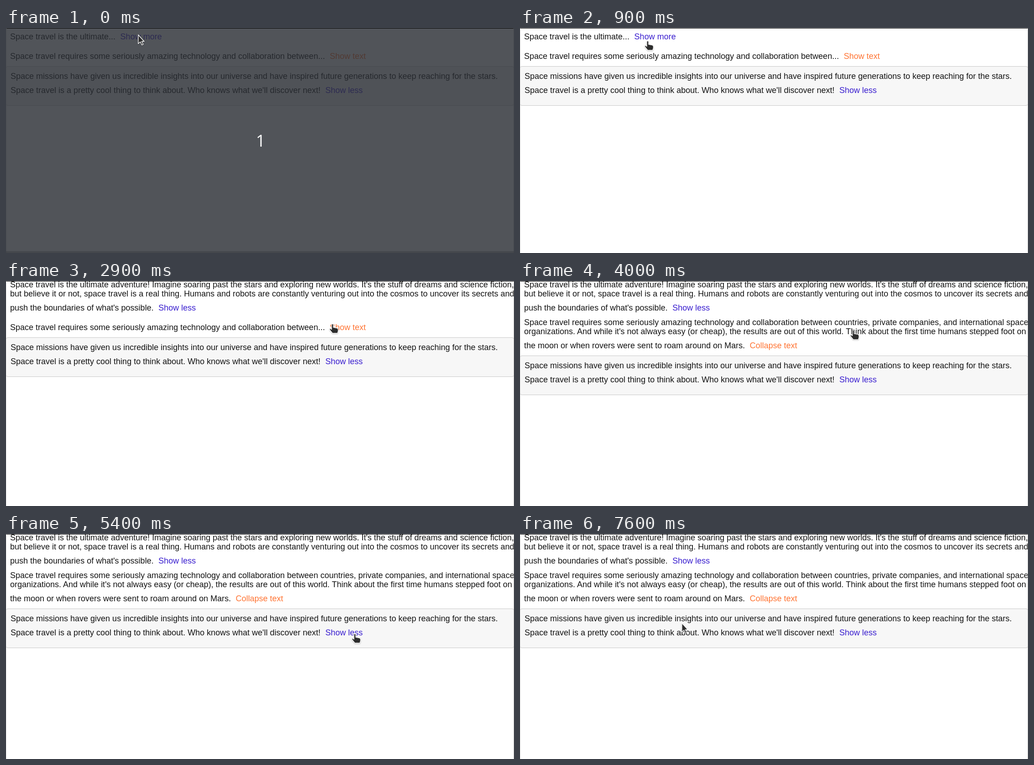
Recreate the animation shown at these times as an HTML page. Size 1114x495 px, loop 8 s.

```html
<!DOCTYPE html>
<html lang="en">
<head>
<meta charset="utf-8">
<title>Show more, show less</title>
<style>
html, body { margin: 0; width: 100%; height: 100%; overflow: hidden; background: #fff; }
#stage {
  position: relative; width: 1114px; height: 495px; overflow: hidden;
  font: 18px/20px "Liberation Sans", Arial, sans-serif; color: #141414; white-space: nowrap;
}
#frame {
  position: absolute; inset: 0; box-sizing: border-box;
  border: solid; border-width: 1px 1px 0; border-color: #000 #c4c4c4 #000 #dedede;
}
#page { position: absolute; left: 0; top: -2px; width: 1114px; }
section { padding-left: 9px; }
.last { padding: 11px 0 12px; }
.box {
  padding: 11px 0 11px 9px;
  background: #f7f7f7; border: 1px solid #c8c8c8; border-radius: 4px;
}
a { margin-left: 10.5px; color: #3a1fcf; }
.orange { color: #ff7433; }
#shade {
  position: absolute; inset: 1px 0 0; box-sizing: border-box;
  background: rgba(41, 45, 51, .81); border-bottom: 4px solid rgba(41, 45, 51, .3);
}
#count {
  position: absolute; left: 548px; top: 222px;
  font: 36px/50px "Open Sans", "Noto Sans", sans-serif; color: #fff;
}
svg { position: absolute; left: 0; top: 0; overflow: visible; filter: drop-shadow(0 1px 1px #0004); }
path { fill: #2d2d2d; stroke: #fff; stroke-width: 1.3; stroke-linejoin: round; }
#beam path { fill: none; stroke-width: 3; }
#beam path + path { stroke: #333; stroke-width: 1.2; }
</style>
</head>
<body>
<div id="stage">
  <div id="page"></div>
  <div id="frame"></div>
  <div id="shade"><div id="count">1</div></div>
  <svg width="1" height="1">
    <g id="arrow"><path d="M0 0V19.500L4.500 15.500L8 22.500L11 21L7.500 14.500H13Z"/></g>
    <g id="hand"><path d="M-2 1.5Q0-1 2 1.5V8L10 9.5Q12.5 10 12.5 13V16L11 21H0L-6 13.5Q-7 10 -4.5 10.5L-2 12.5Z"/></g>
    <g id="beam"></g>
  </svg>
</div>
<script>
const $ = id => document.getElementById(id);
const LOOP = 8000;

const bar = '<path d="M-4-9.5Q-1-9.5 0-8.5Q1-9.5 4-9.5M0-8.5V8.500M-4 9.5Q-1 9.5 0 8.5Q1 9.5 4 9.5"/>';
$('beam').innerHTML = bar + bar;

const sections = [
  {
    short: ['Space travel is the ultimate...'],
    full: [
      "Space travel is the ultimate adventure! Imagine soaring past the stars and exploring new worlds. It's the stuff of dreams and science fiction,",
      'but believe it or not, space travel is a real thing. Humans and robots are constantly venturing out into the cosmos to uncover its secrets and',
      "push the boundaries of what's possible."
    ],
    links: ['Show more', 'Show less'],
    open: t => t >= 1500
  },
  {
    short: ['Space travel requires some seriously amazing technology and collaboration between...'],
    full: [
      'Space travel requires some seriously amazing technology and collaboration between countries, private companies, and international space',
      "organizations. And while it's not always easy (or cheap), the results are out of this world. Think about the first time humans stepped foot on",
      'the moon or when rovers were sent to roam around on Mars.'
    ],
    links: ['Show text', 'Collapse text'],
    color: 'orange',
    open: t => t >= 4000
  },
  {
    short: ['Space missions have given us...'],
    full: [
      'Space missions have given us incredible insights into our universe and have inspired future generations to keep reaching for the stars.',
      "Space travel is a pretty cool thing to think about. Who knows what we'll discover next!"
    ],
    links: ['Show more', 'Show less'],
    style: 'box',
    open: t => t < 6300 || t >= 7600
  }
];

// Each section gets a collapsed and an expanded block; one of them is shown.
const block = (lines, link, color = '') => lines.map((line, i) =>
  i < lines.length - 1
    ? `<div>${line}</div>`
    : `<div class="last">${line}<a class="${color}">${link}</a></div>`).join('');

for (const s of sections) {
  const el = document.createElement('section');
  el.className = s.style || '';
  el.innerHTML = `<div>${block(s.short, s.links[0], s.color)}</div><div>${block(s.full, s.links[1], s.color)}</div>`;
  $('page').append(el);
  [s.closedEl, s.openEl] = el.children;
}

// Pointer way points: time, x, y, shape
const path = [
  [0, 290, 15, 'arrow'], [100, 285, 11, 'hand'], [600, 285, 11, 'hand'], [900, 280, 28, 'hand'],
  [1500, 280, 28, 'beam'], [1900, 280, 28, 'beam'], [2000, 290, 26, 'beam'], [2200, 375, 34, 'arrow'],
  [2500, 575, 66, 'arrow'], [2800, 721, 94, 'hand'], [2900, 716, 94, 'hand'], [3000, 710, 93, 'hand'],
  [3300, 730, 107, 'hand'], [4100, 731, 108, 'beam'], [4800, 731, 108, 'beam'], [4900, 751, 106, 'beam'],
  [5000, 751, 106, 'beam'], [5100, 738, 122, 'arrow'], [5400, 765, 219, 'hand'], [6500, 764, 219, 'arrow'],
  [6800, 764, 219, 'arrow'], [6900, 500, 212, 'arrow'], [7000, 350, 185, 'hand'], [7200, 350, 185, 'hand'],
  [7400, 355, 197, 'hand'], [7600, 355, 196, 'arrow'], [LOOP, 355, 196, 'arrow']
];

function pointer(t) {
  const i = path.findIndex(p => p[0] > t);
  const [t0, x0, y0, shape] = path[i - 1], [t1, x1, y1] = path[i];
  const k = (t - t0) / (t1 - t0);
  return { x: x0 + (x1 - x0) * k, y: y0 + (y1 - y0) * k, shape };
}

function draw(now) {
  const t = Math.floor(now % LOOP / 100) * 100;
  $('shade').style.display = t < 100 ? '' : 'none';
  for (const s of sections) {
    s.openEl.hidden = !s.open(t);
    s.closedEl.hidden = s.open(t);
  }
  const p = pointer(t);
  for (const id of ['arrow', 'hand', 'beam']) {
    $(id).style.display = id === p.shape ? '' : 'none';
    $(id).setAttribute('transform', `translate(${p.x} ${p.y})`);
  }
}

let start;
function tick(now) {
  start ??= now;
  draw(now - start);
  requestAnimationFrame(tick);
}
draw(0);
requestAnimationFrame(tick);
</script>
</body>
</html>
```
